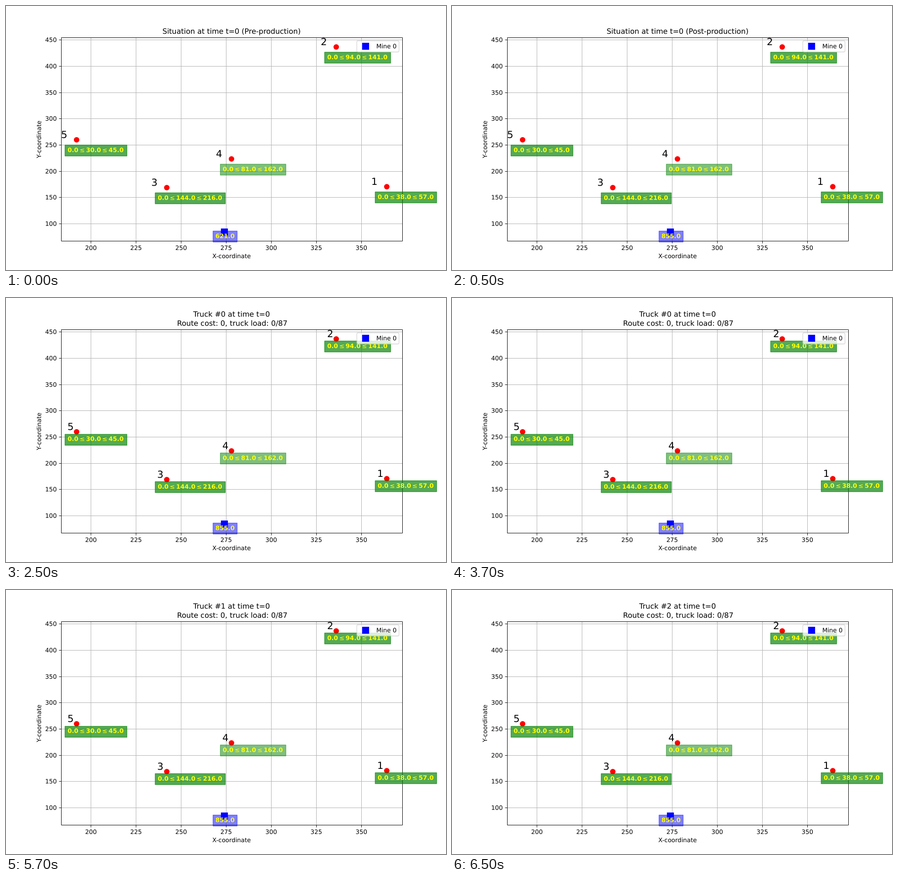
Write an HTML page that moves like this. It is 966 px wide and 580 px high and loops after 8 s.

```html
<!DOCTYPE html>
<html lang="en">
<head>
<meta charset="utf-8">
<title>Mine routes</title>
<style>
  html, body { margin: 0; width: 100%; height: 100%; overflow: hidden; background: #fff; }
  svg { display: block; }
  text { font: 13.333px "DejaVu Sans", sans-serif; text-rendering: geometricPrecision; white-space: pre; }
  .mid { text-anchor: middle; }
  .end { text-anchor: end; }
  .title { font-size: 16px; }
  .id { font-size: 21.333px; }
  .val { font-weight: bold; fill: #ff0; }
  .le { font-weight: normal; }
</style>
</head>
<body>
<svg id="plot" width="966" height="580" viewBox="0 0 966 580"></svg>
<script>
const plot = document.getElementById("plot");
const left = 120.79, right = 869.67, top_ = 69.6, bottom = 516.2;
const midX = (left + right) / 2, midY = (top_ + bottom) / 2;
const px = v => left + (v - 183.4) * (right - left) / 189.2;
const py = v => bottom - (v - 67.4) * (bottom - top_) / 387.2;
// Pixel centres: the nearest edge across, the containing row down
const col = v => Math.floor(v + 0.5) + 0.5;
const row = v => Math.floor(v) + 0.5;

function add(tag, attrs, text = "") {
  const el = document.createElementNS("http://www.w3.org/2000/svg", tag);
  for (const k in attrs) el.setAttribute(k, attrs[k]);
  el.textContent = text;
  return plot.appendChild(el);
}
const line = (d, stroke) => add("path", { d, stroke, fill: "none" });
const label = (x, y, cls, text) => add("text", { x, y, class: cls }, text);
const square = (x, y) => add("rect", {
  x: x - 6.5, y: y - 6.5, width: 14, height: 14, fill: "#00f", stroke: "#00f", "stroke-width": 1.333
});
function box(x, y, width, color, alpha) {
  const x0 = col(x - 25.4), x1 = col(x - 25.4 + width);
  return add("rect", {
    x: x0, y, width: x1 - x0, height: 24, fill: color, stroke: color, "stroke-width": 1.333,
    "stroke-linejoin": "round", "fill-opacity": alpha, "stroke-opacity": alpha
  });
}

// id, x, y, stock, capacity
const sites = [
  [1, 364, 171, 38, 57], [2, 336, 437, 94, 141], [3, 242, 169, 144, 216],
  [4, 278, 224, 81, 162], [5, 192, 260, 30, 45]
];

// Grid and axes
for (let v = 200; v <= 350; v += 25) {
  const x = col(px(v));
  line(`M${x} 70V516`, "#b0b0b0");
  line(`M${x} 516.5v5`, "#000");
  label(px(v), 536, "mid", v);
}
for (let v = 100; v <= 450; v += 50) {
  const y = row(py(v));
  line(`M121 ${y}H870`, "#b0b0b0");
  line(`M121.5 ${y}h-5`, "#000");
  label(111.4, y + 4.5, "end", v);
}
label(midX, 554, "mid", "X-coordinate");
add("text", { class: "mid", transform: `translate(77 ${midY}) rotate(-90)` }, "Y-coordinate");

// Markers
const mineX = px(274), mineY = py(85);
for (const [, x, y] of sites)
  add("circle", { cx: Math.round(px(x)), cy: Math.round(py(y)), r: 6, fill: "#f00" });
square(Math.round(mineX), Math.round(mineY));
line("M121.5 69.5H870.5V516.5H121.5Z", "#000");

// Site labels, which shift when the trucks appear
const tags = sites.map(([id, sx, sy, stock, cap]) => {
  const x = px(sx), y = py(sy);
  const extra = `${stock}${cap}`.length - 4;
  const rect = box(x, 0, 135.25 + 9.28 * extra, "#008000", stock / cap);
  const value = label(x - 19.6, 0, "val", "");
  const le = '<tspan class="le" dx="2.8">≤</tspan><tspan dx="2.8">';
  value.innerHTML = `0.0${le}${stock}.0</tspan>${le}${cap}.0</tspan>`;
  const num = label(0, Math.round(y - 3.9), "id", id);
  return moved => {
    const up = moved ? 6.9 : 0;
    rect.setAttribute("y", row(y + 11.86 - up));
    value.setAttribute("y", Math.round(y + 27.2 - up));
    num.setAttribute("x", Math.floor(x - (moved ? 19.8 : 33.4)));
  };
});
box(mineX, 494.5, 53, "#00f", 0.5);
const ore = label(mineX - 19.6, 510, "val", "");

// Legend
add("rect", {
  x: 770.2, y: 76.5, width: 92.6, height: 24.5, rx: 2.67, fill: "#fff",
  stroke: "#ccc", "stroke-width": 1.333, opacity: 0.8
});
square(789, 88);
label(812.9, 93, "", "Mine 0");

const title1 = label(midX, 41, "title mid", "");
const title2 = label(midX, 61, "title mid", "");

let shown = -1;
function draw() {
  const t = performance.now() % 8000;
  const step = Math.floor((t + 1500) / 2000);
  if (step !== shown) {
    shown = step;
    const trucks = step >= 2;
    title1.textContent = trucks ? `Truck #${step - 2} at time t=0` : "";
    title2.textContent = trucks ? "Route cost: 0, truck load: 0/87"
      : `Situation at time t=0 (${step ? "Post" : "Pre"}-production)`;
    title2.setAttribute("x", midX + (trucks ? 1.5 : 0));
    ore.textContent = step ? "855.0" : "621.0";
    tags.forEach(place => place(trucks));
  }
  requestAnimationFrame(draw);
}
draw();
</script>
</body>
</html>
```
